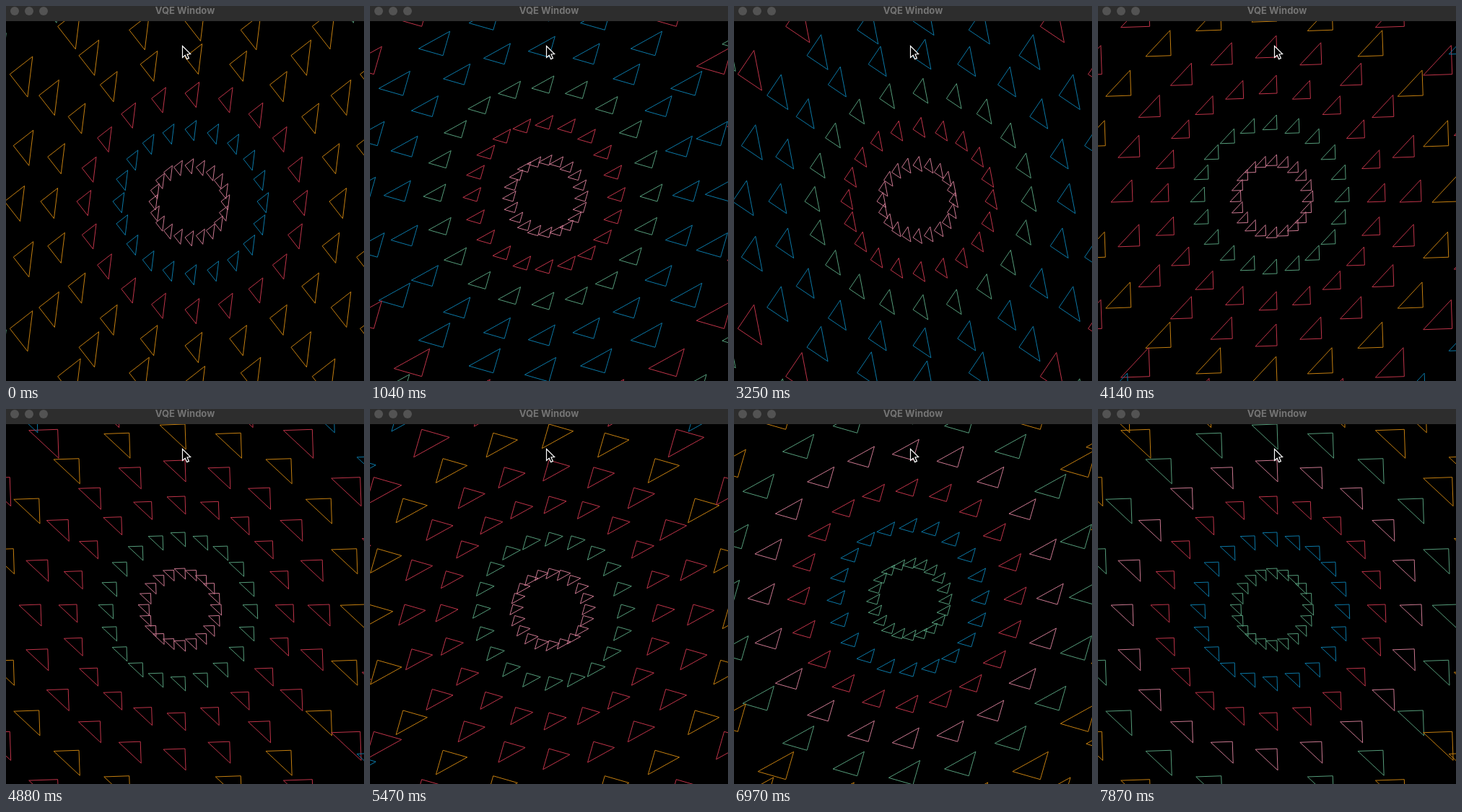
An HTML page with a canvas that plays this animation: 496x520 px, repeating every 8 s.

```html
<!DOCTYPE html>
<html lang="en">
<head>
<meta charset="utf-8">
<title>Spinning triangles</title>
<style>
  html, body { margin: 0; width: 100%; height: 100%; overflow: hidden; background: #000; }
  canvas { display: block; }
</style>
</head>
<body>
<canvas id="stage" width="496" height="520"></canvas>
<script>
const ctx = document.getElementById('stage').getContext('2d');
const LOOP = 8000, FRAMES = 54;
const CENTER = { x: 248, y: 271 };
const PER_RING = 20;
const SPIN = 18, START_ANGLE = 322;   // degrees
const SHORT_FRAMES = [5, 12, 15, 19, 22, 24, 30, 35];

const COLORS = { p: '#cb7890', b: '#0b78a6', r: '#bf3449', o: '#c47f10', g: '#559c7a' };
// One letter per ring, inside out; the set changes after every full turn.
const PALETTES = ['pbrooog', 'prgbbrg', 'pgrrorb', 'gbrpgoo'];
const FIRST_CHANGE = 3, TURN = 360 / SPIN;

const frameStarts = [0];
for (let i = 0; i < FRAMES - 1; i++) {
  frameStarts.push(frameStarts[i] + (SHORT_FRAMES.includes(i) ? 140 : 150));
}

const rad = degrees => degrees * Math.PI / 180;

function tracePolygon(points) {
  ctx.beginPath();
  points.forEach(([x, y]) => ctx.lineTo(x, y));
  ctx.closePath();
}

function drawRing(ring, angle, color) {
  const radius = 50 * ring, leg = 10 + 5 * ring;
  const dx = leg * Math.cos(angle), dy = leg * Math.sin(angle);
  ctx.strokeStyle = color;
  ctx.lineWidth = 1;
  for (let k = 0; k < PER_RING; k++) {
    const a = rad(k * 360 / PER_RING);
    const x = CENTER.x + radius * Math.cos(a);
    const y = CENTER.y + radius * Math.sin(a);
    tracePolygon([[x, y], [x + dx, y + dy], [x - dy, y + dx]]);
    ctx.stroke();
  }
}

function drawTitleBar() {
  ctx.fillStyle = '#2d2d2d';
  ctx.fillRect(0, 0, 496, 21);
  ctx.fillStyle = '#535353';
  for (const x of [12, 32, 52]) {
    ctx.beginPath();
    ctx.arc(x, 7, 6, 0, 2 * Math.PI);
    ctx.fill();
  }
  ctx.fillStyle = '#747474';
  ctx.font = '700 13px Inter, sans-serif';
  ctx.textAlign = 'center';
  ctx.fillText('VQE Window', 248, 11);
}

function drawCursor() {
  tracePolygon([[244.5, 55.5], [244.5, 71.5], [248.2, 68.2], [250.6, 73.6],
                [253.4, 72.4], [251, 67], [255.6, 66.6]]);
  ctx.fillStyle = '#000';
  ctx.fill();
  ctx.strokeStyle = '#fff';
  ctx.lineWidth = 1.2;
  ctx.stroke();
}

function render(now) {
  const time = now % LOOP;
  const frame = frameStarts.findLastIndex(start => start <= time);
  const palette = PALETTES[Math.floor((frame - FIRST_CHANGE) / TURN) + 1];
  const angle = rad(START_ANGLE - SPIN * frame);

  ctx.fillStyle = '#000';
  ctx.fillRect(0, 0, 496, 520);
  [...palette].forEach((key, i) => drawRing(i + 1, angle, COLORS[key]));
  drawTitleBar();
  drawCursor();
}

const origin = performance.now();
function tick() {
  render(performance.now() - origin);
  requestAnimationFrame(tick);
}
tick();
</script>
</body>
</html>
```
